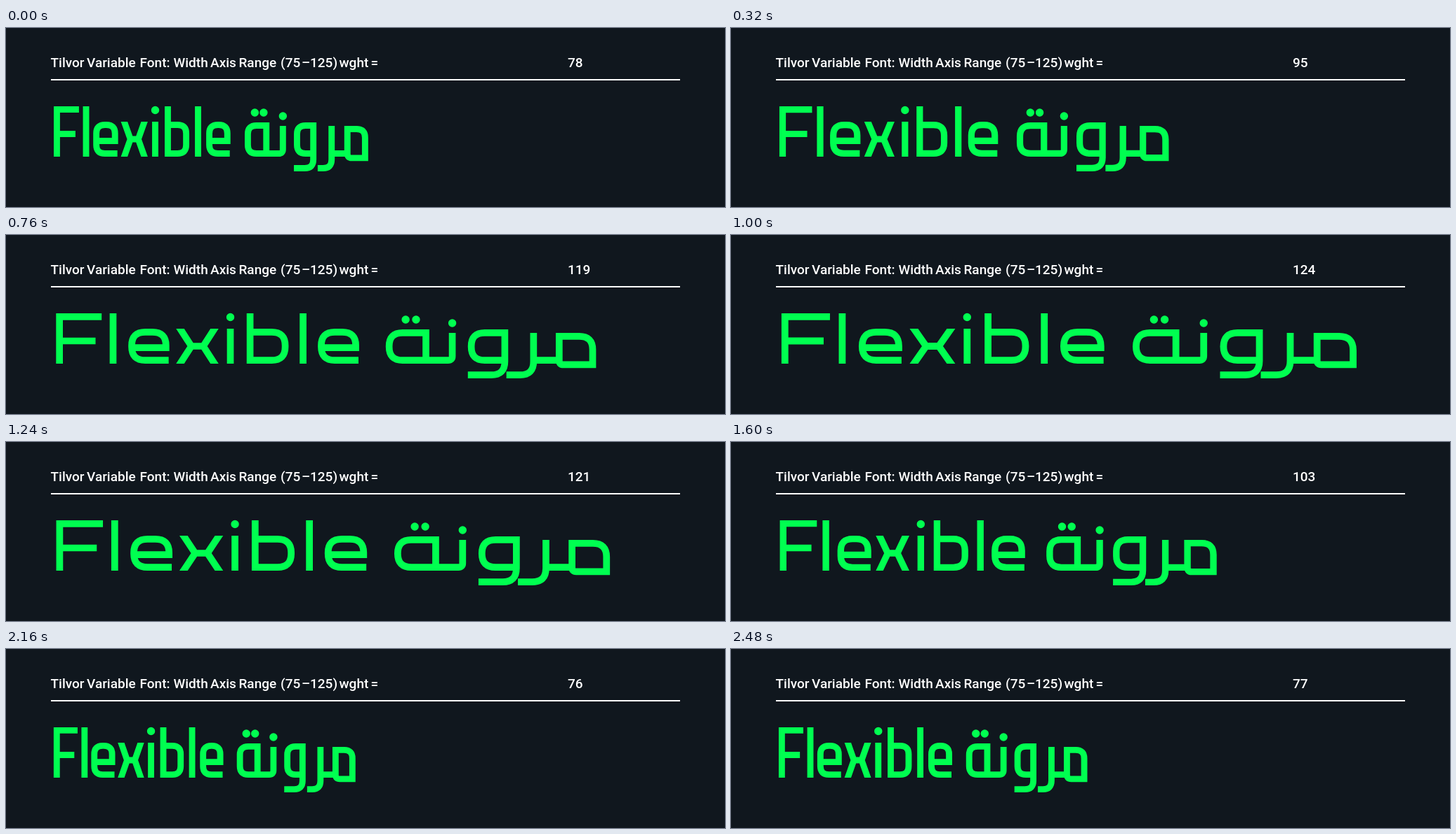
Write an HTML page that moves like this. It is 1024 px wide and 256 px high and loops after 2520 ms.

```html
<!DOCTYPE html>
<html lang="en">
<head>
<meta charset="utf-8">
<title>Variable font width axis</title>
<style>
  html, body { margin: 0; height: 100%; overflow: hidden; background: #10171e; }
  svg { display: block; width: 100vw; height: 100vh; }
  text { font: 500 19px Roboto, sans-serif; fill: #fff; }
  path { fill: none; stroke: #00ff50; }
  #dots { stroke-width: 11.4; stroke-linecap: round; }
</style>
</head>
<body>
<svg viewBox="0 0 1024 256">
  <clipPath id="band"><rect y="134" width="1024" height="50"/></clipPath>
  <rect x="64" y="73" width="896" height="2" fill="#fff"/>
  <text y="56"><tspan x="63.5">Tilvor</tspan> <tspan x="115">Variable</tspan> <tspan x="190.5">Font:</tspan> <tspan x="238.5">Width</tspan> <tspan x="291">Axis</tspan> <tspan x="331.5">Range</tspan> <tspan x="391">(75</tspan> <tspan x="421">–</tspan> <tspan x="433">125)</tspan> <tspan x="474.5">wght</tspan> <tspan x="519.5">=</tspan></text>
  <text id="value" x="800" y="56"></text>
  <g id="word" role="img" aria-label="Flexible مرونة">
    <path id="strokes"/>
    <path id="cross" clip-path="url(#band)"/>
    <path id="dots"/>
  </g>
</svg>
<script>
const $ = id => document.getElementById(id);
const STEP = 40, STEPS = 63;

// Polyline through [x, y, corner radius]
function line(...pts) {
  const toward = ([x, y], [a, b], r) => {
    const k = r / Math.hypot(a - x, b - y);
    return [x + (a - x) * k, y + (b - y) * k];
  };
  return pts.map((p, i) => {
    const [x, y, r] = p;
    if (!i) return `M${x} ${y}`;
    if (!r) return `L${x} ${y}`;
    return `L${toward(p, pts[i - 1], r)}Q${x} ${y} ${toward(p, pts[i + 1], r)}`;
  }).join("");
}

function draw(width) {
  const k = (width - 100) / 25;
  // Value between the narrow, normal and wide designs
  const at = (narrow, normal, wide) =>
    normal + k * (k < 0 ? normal - narrow : wide - normal);

  const weight = at(8.8, 9.3, 9.8), half = weight / 2;
  const left = (...m) => at(...m) + half;
  const right = (...m) => at(...m) - half;
  const R = at(11.5, 16, 20);
  // Centre lines of the horizontal strokes
  const cap = 112 + half, xh = 134 + half, base = 184 - half;
  const loop = 135 + half, head = 140 + half, foot = 190.3 - half, tail = 205 - half;

  const bar = x => line([x, 112], [x, 184]);
  const e = (l, r) => line([r + half - 1, base], [l, base, R], [l, xh, R],
    [r, xh, R], [r, 166 - half], [l, 166 - half]);

  const F = left(67.8, 69.2, 71.9);
  const i = at(203.7, 258.7, 336.5);
  const b = left(216.5, 276, 361.4), bR = right(249.3, 322.7, 424.7);
  const ta = left(323.3, 427.6, 572.4), taR = right(356.5, 473.5, 639);
  const noon = right(378.8, 503.7, 678.6);
  const waw = left(389.6, 517.3, 697), wawR = right(419.3, 562, 758);
  const ra = at(421.6, 561, 755), raR = right(444.6, 592, 802);
  const meem = left(456.8, 613, 830.4), meemR = right(489, 656.7, 891.6);

  $("word").setAttribute("stroke-width", weight);
  $("strokes").setAttribute("d", [
    line([at(101, 119, 141), cap], [F, cap], [F, 184]),
    line([F, 151.5], [at(96.5, 111.5, 132), 151.5]),
    bar(at(110.8, 131, 158.5)),
    e(left(120, 146.3, 182), right(153.5, 192, 244)),
    line([i, 134], [i, 184]),
    line([b, 112], [b, base], [bR, base, R], [bR, xh, R], [b, xh]),
    bar(at(261, 339.2, 446.5)),
    e(left(272, 354, 469.3), right(304.6, 399, 532)),
    line([noon, 140], [noon, base, 6], [ta, base, R], [ta, loop, R],
      [taR, loop], [taR, base]),
    line([waw - half, tail], [wawR, tail, R], [wawR, loop], [waw, loop, R],
      [waw, base, R], [wawR, base]),
    line([ra, tail], [raR, tail, R], [raR, 140]),
    line([raR, base], [meem, base]),
    line([meem, 160], [meem, head], [meemR, head, R], [meemR, foot],
      [meem, foot, 6], [meem, 160])
  ].join(""));

  // The x: two chevrons joined by a short bar, cut flat at top and bottom
  const x = at(156.5, 197.3, 254.7), xR = at(194.8, 243, 319.5);
  const chevron = (end, mid) => {
    const out = end + (end - mid) * .3;
    return line([out, 126.5], [mid, 159], [out, 191.5]);
  };
  const arm = .36 * (xR - x), inset = half * 1.2;
  $("cross").setAttribute("d", chevron(x + inset, x + arm) +
    chevron(xR - inset, xR - arm) + line([x + arm, 159], [xR - arm, 159]));

  $("dots").setAttribute("d", [
    [i, 117.5],
    [at(336.4, 448.5, 602.8), 121],
    [at(348.8, 462, 618), 121],
    [noon, 126]
  ].map(([cx, cy]) => `M${cx} ${cy}h.01`).join(""));

  $("value").textContent = Math.floor(width);
}

function frame() {
  const step = Math.floor(performance.now() / STEP) % STEPS;
  draw(100 + 25 * Math.sin(2 * Math.PI * (step - 10) / STEPS));
  requestAnimationFrame(frame);
}
frame();
</script>
</body>
</html>
```
